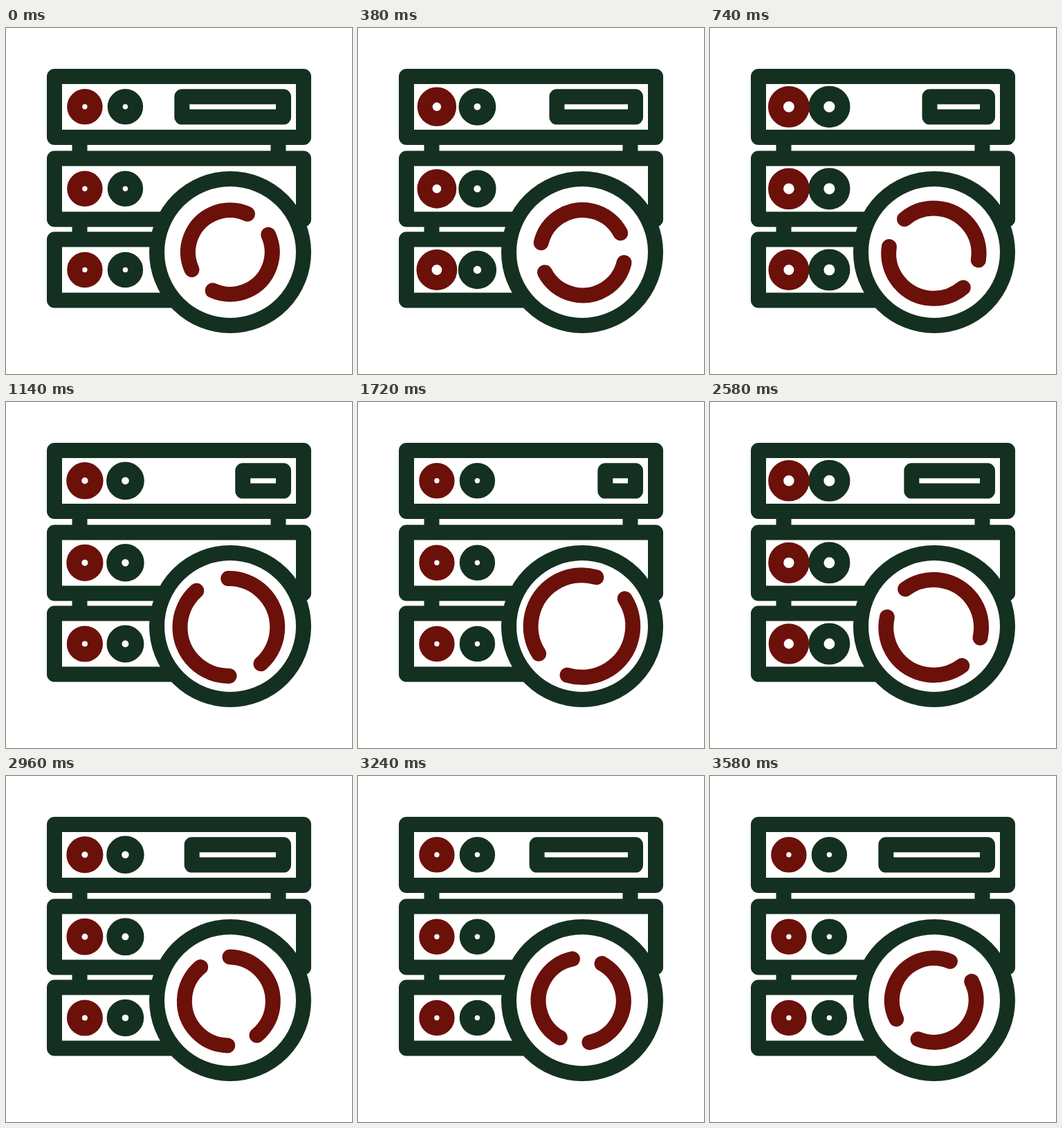
Animation, 500 px wide and 500 px high, one loop 3600 ms. Source, as an HTML page with a canvas:

```html
<!DOCTYPE html>
<html lang="en">
<head>
<meta charset="utf-8">
<title>Server sync</title>
<style>
html, body { margin: 0; width: 100%; height: 100%; overflow: hidden; background: #fff; }
canvas { display: block; width: 500px; height: 500px; }
</style>
</head>
<body>
<canvas id="stage"></canvas>
<script>
const LOOP = 3600, HALF = LOOP / 2, TAU = Math.PI * 2;
const GREEN = '#143021', RED = '#6c100a', WHITE = '#fff';
const canvas = document.getElementById('stage');
const ctx = canvas.getContext('2d');
const ratio = window.devicePixelRatio || 1;
canvas.width = canvas.height = 500 * ratio;

// Each rack row: top line, right end, light height, start of the red and green pulse.
const ROWS = [
  { top: 70, right: 430, lightY: 113.8, red: 152, green: 232 },
  { top: 188.5, right: 430, lightY: 232.3, red: 140, green: 215 },
  { top: 305.5, right: 324, lightY: 349.5, red: 68, green: 182 }
];
const PULSE = { rise: 420, hold: 75, fall: 720 };

const clamp = x => Math.min(1, Math.max(0, x));
const easeSine = x => (1 - Math.cos(Math.PI * clamp(x))) / 2;
const easeSmooth = x => x * x * x * (10 - 15 * x + 6 * x * x);
const easeOut = x => 1 - Math.pow(1 - Math.pow(x, 1.16), 2.15);

// Goes 0 to 1 in the first half of the loop and back in the second.
function thereAndBack(t, ease) {
  return t < HALF ? ease(t / HALF) : 1 - ease((t - HALF) / HALF);
}

function pulse(t, start) {
  const age = t % HALF - start;
  const up = easeSine(age / PULSE.rise);
  const down = easeSine((age - PULSE.rise - PULSE.hold) / PULSE.fall);
  return up - down;
}

function strokeRect(x, y, right, bottom) {
  ctx.strokeStyle = GREEN;
  ctx.strokeRect(x, y, right - x, bottom - y);
}

function arc(x, y, radius, color, from = 0, to = TAU) {
  ctx.strokeStyle = color;
  ctx.beginPath();
  ctx.arc(x, y, radius, from, to);
  ctx.stroke();
}

function drawRack(t) {
  ctx.fillStyle = GREEN;
  ctx.fillRect(95.5, 160, 22, 140);
  ctx.fillRect(382.5, 160, 22, 30);
  for (const row of ROWS) {
    ctx.fillStyle = WHITE;
    ctx.fillRect(70, row.top, row.right - 70, 88);
    strokeRect(70, row.top, row.right, row.top + 88);
    arc(172.4, row.lightY, 14.7 + 4.4 * pulse(t, row.green), GREEN);
    arc(113.9, row.lightY, 14.7 + 4.4 * pulse(t, row.red), RED);
  }
  strokeRect(254.3 + 103.2 * thereAndBack(t, easeOut), 99.2, 401, 128.6);
}

function drawSync(t) {
  ctx.fillStyle = WHITE;
  ctx.beginPath();
  ctx.arc(324, 324, 106, 0, TAU);
  ctx.fill();
  arc(324, 324, 106, GREEN);

  // The spinning arcs drift slightly around their pivot.
  const phase = TAU * t / HALF;
  const lift = 1 - Math.cos(phase);
  const x = 323.8 - 0.6 * lift + 1.3 * Math.sin(phase);
  const y = 324 + 0.9 * lift;
  const radius = 60.8 + 13 * thereAndBack(t, easeSmooth);
  const span = 139 * Math.PI / 180;
  const middle = Math.PI / 4 + TAU * t / LOOP;
  for (const angle of [middle, middle + Math.PI]) {
    arc(x, y, radius, RED, angle - span / 2, angle + span / 2);
  }
}

function draw(now) {
  const t = now % LOOP;
  ctx.setTransform(ratio, 0, 0, ratio, 0, 0);
  ctx.fillStyle = WHITE;
  ctx.fillRect(0, 0, 500, 500);
  ctx.lineWidth = 22;
  ctx.lineCap = ctx.lineJoin = 'round';
  drawRack(t);
  drawSync(t);
}

let begin = null;
function tick(now) {
  if (begin === null) begin = now;
  draw(Math.max(0, now - begin));
  requestAnimationFrame(tick);
}
draw(0);
requestAnimationFrame(tick);
</script>
</body>
</html>
```
